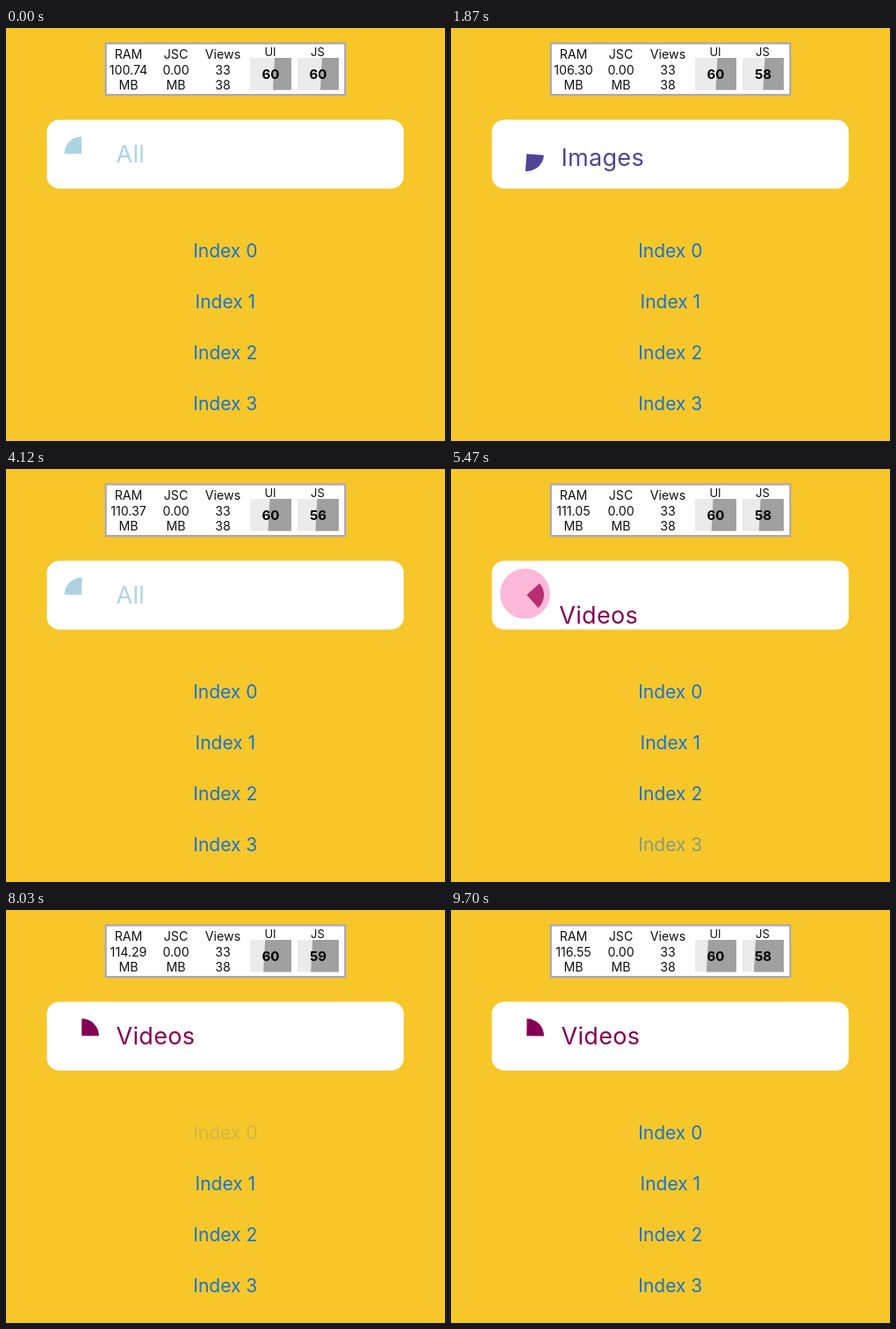
An HTML page with a canvas that plays this animation: 500x470 px, repeating every 9.73 s.

```html
<!DOCTYPE html>
<html lang="en">
<head>
<meta charset="utf-8">
<style>
  html, body { margin: 0; width: 100%; height: 100%; overflow: hidden; background: #f7c729; }
  canvas { display: block; }
</style>
</head>
<body>
<canvas id="stage" width="500" height="470"></canvas>
<script>
const ctx = document.getElementById('stage').getContext('2d');
const LOOP = 9730;
const CARD = [46.5, 104.5, 406.5, 78.2];
const ICON = { x: 86.2, y: 143.3, r: 19.7 };
const SLIDE = 88;

const tabs = [
  { label: 'All', color: [173, 212, 226], glow: [135, 206, 235] },
  { label: 'Videos', color: [132, 0, 84], glow: [247, 105, 172] },
  { label: 'Images', color: [80, 68, 148], glow: [123, 104, 238] },
  { label: 'Files', color: [200, 40, 80], glow: [247, 105, 172] }
];

// Release time of each tap and the tab it selects
const taps = [[520, 1], [1340, 2], [2350, 3], [3200, 0], [4480, 1],
              [5385, 3], [6200, 0], [7040, 1], [8100, 0], [9110, 1]];

// Readings refreshed once per second
const memory = [100.74, 104.12, 106.30, 108.57, 110.37, 111.05, 111.52, 111.86, 114.29, 115.63, 116.55];
const jsRate = [60, 59, 58, 57, 56, 58, 59, 58, 59, 57, 58];

const clamp = v => Math.max(0, Math.min(1, v));
const smooth = v => { v = clamp(v); return v * v * (3 - 2 * v); };
const mix = (a, b, k) => a.map((v, i) => v + (b[i] - v) * k);
const rgb = (c, alpha = 1) => `rgba(${c.map(Math.round).join()},${alpha})`;

// Damped spring: stiffness 100, damping 10, mass 1
function spring(ms) {
  const s = ms / 1000, w = Math.sqrt(75);
  return 1 - Math.exp(-5 * s) * (Math.cos(w * s) + 5 / w * Math.sin(w * s));
}

function text(str, x, y, size, color, align = 'center', weight = 400) {
  ctx.font = `${weight} ${size}px Inter, sans-serif`;
  ctx.textAlign = align;
  ctx.fillStyle = color;
  ctx.fillText(str, x, y + size * 0.364);
}

function rect(color, x, y, w, h) {
  ctx.fillStyle = color;
  ctx.fillRect(x, y, w, h);
}

function disc(color, x, y, r, from, to) {
  ctx.fillStyle = color;
  ctx.beginPath();
  if (to - from < 6) ctx.moveTo(x, y);
  ctx.arc(x, y, r, from, to);
  ctx.fill();
}

function gauge(name, x, rate, edge) {
  text(name, x + 23, 27, 13, '#111');
  rect('#ebebeb', x, 34, 47, 36.5);
  ctx.fillStyle = '#a0a0a0';
  ctx.beginPath();
  ctx.moveTo(edge + 1, 34);
  ctx.lineTo(x + 47, 34);
  ctx.lineTo(x + 47, 70.5);
  ctx.lineTo(edge - 1, 70.5);
  ctx.fill();
  text(rate, x + 23.5, 52.3, 15, '#000', 'center', 700);
}

function drawMonitor(t) {
  const tick = Math.floor((t + 500) / 1000);
  rect('#aaaab4', 112.5, 16.3, 275, 61);
  rect('#fff', 114.8, 18.6, 270.4, 56.4);
  const columns = [[139.5, 'RAM', memory[tick].toFixed(2), 'MB'],
                   [193.5, 'JSC', '0.00', 'MB'],
                   [247, 'Views', '33', '38']];
  for (const [x, ...lines] of columns)
    lines.forEach((line, i) => text(line, x, 30 + 17.5 * i, 14.2, '#111'));
  const scroll = t * 0.00135;
  gauge('UI', 278, 60, 305 - scroll);
  gauge('JS', 332, jsRate[tick], 359 - scroll);
}

function drawLabel(tab, offset) {
  ctx.letterSpacing = '0.3px';
  text(tab.label, 125.6 - offset * offset / 240, 143 + offset, 27, rgb(tab.color), 'left');
  ctx.letterSpacing = '0px';
}

function drawCard(t) {
  let from = 0, to = 0, start = -5000;
  for (const [time, index] of taps)
    if (t >= time) [from, to, start] = [to, index, time];

  const p = spring(t - start), dir = Math.sign(to - from);
  const a = tabs[from], b = tabs[to];
  const pulse = from === to ? 0 : Math.sin(Math.PI * clamp(p)) ** 2;
  const glow = mix(a.glow, b.glow, clamp(p));
  const color = mix(mix(a.color, b.color, clamp(p)), glow, pulse * 0.65);

  ctx.save();
  ctx.beginPath();
  ctx.roundRect(...CARD, 14);
  ctx.fillStyle = '#fff';
  ctx.fill();
  ctx.clip();
  disc(rgb(glow, 0.85 * pulse), ICON.x - 1.8, ICON.y - 1.5, 28.5, 0, 2 * Math.PI);
  const angle = Math.PI * (-1 + (from + (to - from) * p) / 2);
  disc(rgb(color), ICON.x, ICON.y, ICON.r, angle, angle + Math.PI / 2);
  if (from !== to) drawLabel(a, dir * SLIDE * p);
  drawLabel(b, -dir * SLIDE * (1 - p));
  ctx.restore();
}

function drawButtons(t) {
  for (let i = 0; i < 4; i++) {
    let dim = 0;
    for (const [time, index] of taps)
      if (index === i)
        dim = Math.max(dim, smooth((t - time + 150) / 70) * (1 - smooth((t - time) / 200)));
    ctx.globalAlpha = 1 - 0.82 * dim;
    text(`Index ${i}`, 249.8, 253 + 58 * i, 21, '#1673d4');
  }
  ctx.globalAlpha = 1;
}

function frame(now) {
  const t = now % LOOP;
  rect('#f7c729', 0, 0, 500, 470);
  drawMonitor(t);
  drawCard(t);
  drawButtons(t);
  requestAnimationFrame(frame);
}
requestAnimationFrame(frame);
</script>
</body>
</html>
```
